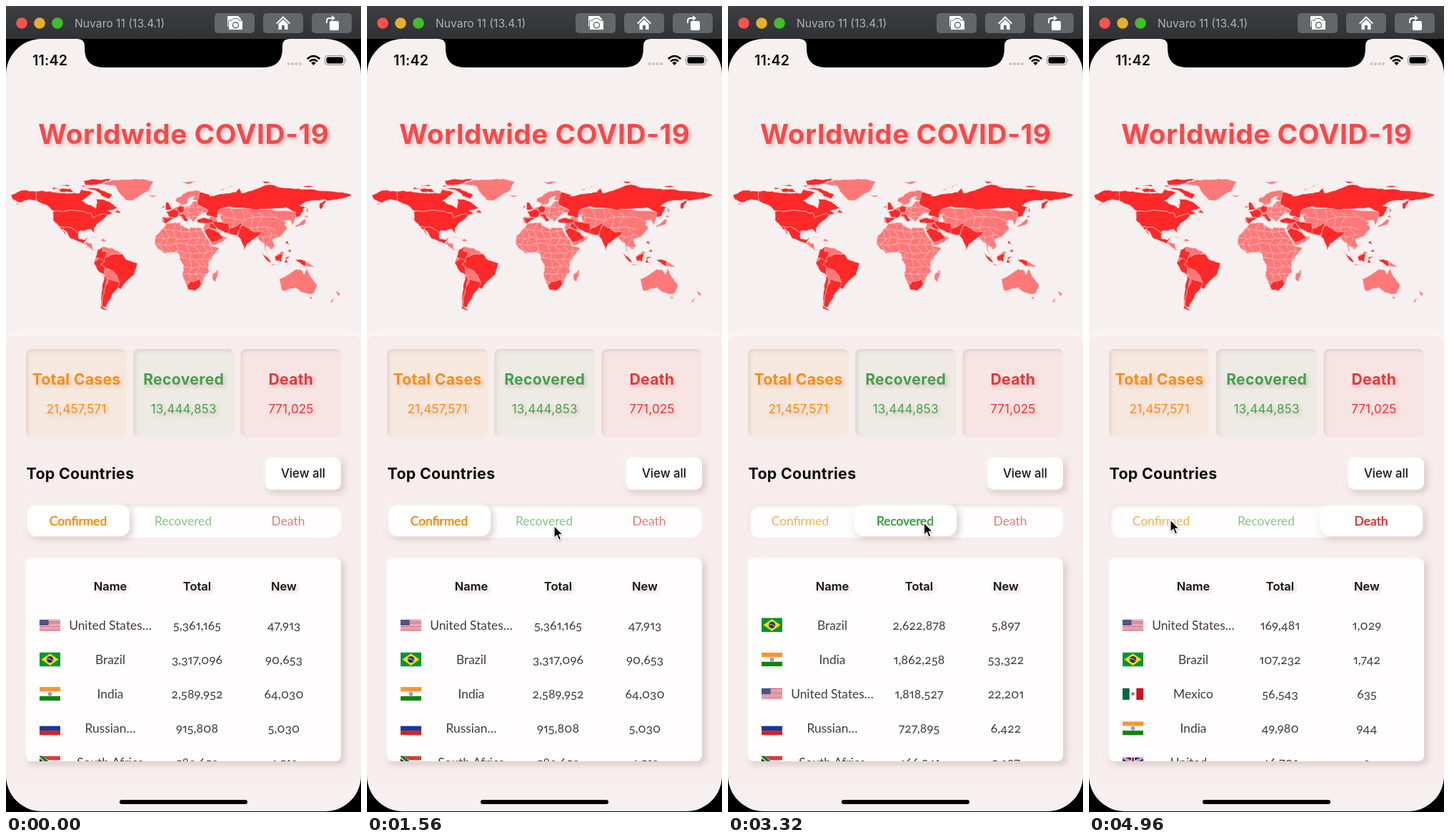
These frames come from a looping animation (497 px wide and 1128 px high, 5 s). An HTML page:

```html
<!DOCTYPE html>
<html lang="en">
<head>
<meta charset="utf-8">
<title>Worldwide COVID-19</title>
<style>
html,body{margin:0;width:100%;height:100%;overflow:hidden;background:#000}
svg{display:block;width:497px;height:1128px}
svg svg{width:auto;height:auto}
text{font-family:Inter,sans-serif}
.mid{text-anchor:middle}
.bold{font-weight:700;letter-spacing:.3px}
.title{font-weight:700;letter-spacing:.55px}
.value{letter-spacing:.2px}
.lato{font-family:Lato,sans-serif;font-size:17.4px;text-anchor:middle}
.num{font-variant-numeric:oldstyle-nums proportional-nums;letter-spacing:.1px}
.glow{filter:drop-shadow(-3px -3px 3px rgba(255,255,255,.7)) drop-shadow(3px 3px 2.5px rgba(150,110,110,.3))}
.raise{filter:drop-shadow(-3px -3px 4px rgba(255,255,255,.7)) drop-shadow(4px 4px 4px rgba(150,115,115,.33))}
.land path{stroke:#f7efef;stroke-width:.35;stroke-linejoin:round}
</style>
</head>
<body>
<svg id="stage" viewBox="0 0 497 1128" xmlns="http://www.w3.org/2000/svg"></svg>
<script>
const LOOP = 5000, STEP = 40, PAGE_W = 499, TAB_W = 147;

// Key points of each land, longitude then latitude; '/' parts islands
const pale = {
  centralAmerica: '-92 15 -88 18 -88 16 -83 15 -82 9 -77 8 -83 8',
  caribbean: '-85 22 -74 20 -78 21/-74 18 -72 20 -68 18',
  southAmerica: '-77 8 -71 12 -61 10 -51 4 -48 -1 -35 -6 -39 -18 -48 -26 -58 -34 -70 -40 -70 -18 -81 -5 -79 2',
  greenland: '-73 78 -60 82 -30 83 -18 80 -24 70 -43 60 -48 61 -54 68 -58 75',
  northAtlantic: '-24 65.5 -15 66 -19 63.5/-10 52 -8 55 -6 53/11 79.5 27 80 17 77',
  africa: '-17 21 -17 14 -13 9 -7 4.5 4 6 9 4 9 -1 13 -7 12 -17 18 -33 26 -34 33 -27 35 -20 40 -15 39 -5 51 11 43 12 35 25 32 31 20 32 19 30 10 34 10 37 -5 36 -10 30',
  madagascar: '49 -12 50 -16 47 -25 44 -23 44 -17',
  europe: '-9 43 -9 37 -5 36 3 42 9 44 16 38 18 40 13 45 20 41 23 36 26 41 28 43 31 46 39 47 39 50 28 56 28 59 23 59 20 54.5 12 54 10 57 8 54 -5 48 -1 46 -2 43',
  scandinavia: '5 59 5 62 15 68 25 71 31 70 28 60 22 61 25 65 18 62 17 57 13 55.5 8 58',
  asia: '36 36 34 31 39 21 43 13 52 16 60 22 52 24 48 30 56 27 67 25 73 20 77 8 80 15 90 22 95 16 98 15 99 8 103 1 100 8 100 13 105 9 109 12 106 19 114 22 122 30 119 35 122 37 118 39 125 40 127 34 129 37 131 43 134 48 90 52 50 52 47 46 53 45 51 44 53 37 49 38 47 43 41 43',
  borneoPapua: '109 2 117 7 119 5 115 2/141 -3 151 -10 141 -9',
  japan: '130 32 131 34 140 41 142 39 140 35/140 42 142 45 145 43',
  australia: '114 -22 116 -33 118 -35 131 -31 136 -35 144 -38.5 150 -37 153 -28 146 -19 142 -11 140 -17.5 136 -12 131 -12 122 -18/145 -41 148 -41 147 -43.5',
  newZealand: '173 -35 178 -38 175 -41/173 -41 169 -46.5 167 -46'
};
const strong = {
  alaska: '-168 66 -157 71 -141 70 -141 60 -150 61 -164 55 -158 58 -166 61',
  canada: '-141 70 -128 70 -115 68 -96 68 -94 72 -82 69 -94 60 -82 54 -79 52 -78 62 -70 61 -65 59 -56 52 -66 49.5 -61 46 -67 45 -70 47 -75 45 -82 42 -84 47 -95 49 -123 49 -130 55 -141 60',
  arctic: '-90 73 -76 73 -62 67 -65 62 -73 65 -78 70/-118 72 -106 73 -102 69 -116 69/-125 72 -124 74 -117 73/-90 76.5 -92 81 -62 82.5 -78 76.5/-95 76 -80 75.5 -92 74.7/-117 76 -106 76 -108 75',
  newfoundland: '-59 48 -56 51 -53 47',
  usa: '-124 48 -123 49 -95 49 -84 47 -82 42 -75 45 -70 47 -67 45 -76 37 -81 31 -80 25 -84 30 -97 28 -97 26 -106 32 -117 32.5 -124 40',
  mexico: '-117 32.5 -106 32 -97 26 -97 20 -91 19 -87 21.5 -92 15 -105 20 -114 31 -110 23',
  brazil: '-51 4 -48 -1 -35 -6 -39 -18 -48 -26 -53 -33 -58 -30 -54 -25 -60 -15 -70 -10 -74 -7 -70 -4 -69 1 -60 4',
  argentina: '-66 -22 -54 -26 -58 -34 -62 -39 -69 -52 -73 -50 -70 -33',
  chile: '-70 -18 -67 -23 -70 -33 -73 -50 -66 -55 -74 -53 -73 -37',
  peru: '-81 -5 -75 0 -70 -4 -74 -7 -70 -10 -70 -18 -76 -14',
  colombia: '-77 8 -71 12 -72 7 -67 6 -69 1 -70 -4 -79 1',
  southAfrica: '17 -29 20 -25 30 -22 32 -28 26 -34 18 -34',
  britain: '-5 50 -5 58.5 -2 57 1.5 52',
  westEurope: '-9 43 -7 37 -5 36 3 42/-2 43 3 42 7 44 8 49 2 51 -5 48/6 51 8 47.5 13 48 14 54 8 54/7 45 13 46 18 40 16 38 10 44',
  turkey: '27 40 36 42 44 40 44 37 36 36 28 37',
  russia: '28 60 30 69 41 67 40 65 68 69 72 73 74 68 104 77 114 74 140 72 180 69 190 66 178 62 163 60 157 51 156 57 163 61 142 59 135 55 141 53 136 44 131 43 131 48 121 53 90 50 61 54 50 50 48 42 37 45 39 50 28 56',
  siberianIsles: '52 71 68 77 58 73/96 80 105 79 100 78/138 75.5 150 75 143 74/142 54 144 49 142 46',
  middleEast: '44 39 54 37 61 36 62 25 50 30 45 34/42 37 45 35 48 30 39 32/35 28 39 21 43 16 55 21 50 27 46 29 38 31',
  southAsia: '62 25 61 30 75 37 70 24/70 23 71 28 74 35 79 32 88 27 97 28 90 22 80 15 77 8 73 20',
  indonesia: '95 5.5 106 -5 102 -4/105 -6.5 114 -8 107 -7.5/109 1.5 117 4 116 -4 110 -3/119 -5 120 1 125 1.5 121 -1 123 -5/131 -1 141 -3 141 -9 133 -4',
  philippines: '120 16 122 18 124 13/122 7 126 9 126 6'
};

// Repeatable noise, -1 to 1, so that neighbours share the same border
const noise = (x, y) => { const v = Math.sin(x * 12.9898 + y * 78.233) * 43758.5453; return (v - Math.floor(v)) * 2 - 1; };
function rough([ax, ay], [bx, by], depth) {
  const x = (ax + bx) / 2, y = (ay + by) / 2, d = Math.min(.7, Math.hypot(bx - ax, by - ay) * .13);
  const m = [x + d * noise(x, y), y + d * noise(y, x)];
  return depth ? [...rough([ax, ay], m, depth - 1), ...rough(m, [bx, by], depth - 1)] : [[ax, ay]];
}
function coast(part) {
  const v = part.split(' ').map(Number), pts = [];
  for (let i = 0; i < v.length; i += 2) pts.push([v[i], v[i + 1]]);
  const out = pts.flatMap((p, i) => rough(p, pts[(i + 1) % pts.length], 3));
  return `M${out.map(p => p.map(n => n.toFixed(2))).join(' ')}Z`;
}
const outline = s => s.split('/').map(coast).join('');
const lands = (set, fill) => `<g fill="${fill}">${Object.values(set).map(s => `<path d="${outline(s)}"/>`).join('')}</g>`;

// Uneven net of inland borders
function net(left, bottom, cols, rows, step) {
  const node = (i, j) => {
    const x = left + i * step + (j % 2) * step / 2, y = bottom + j * step;
    return [x + noise(x, y) * step * .25, y + noise(y, x) * step * .25];
  };
  const edge = (a, b) => `M${[...rough(a, b, 2), b].join(' ')}`;
  let d = '';
  for (let i = 0; i < cols; i++) for (let j = 0; j < rows; j++) {
    d += edge(node(i, j), node(i + 1, j));
    if (noise(i, j + left) < .7) d += edge(node(i, j), node(i, j + 1));
  }
  return `<path d="${d}" fill="none"/>`;
}
const map = `<g class="land" transform="translate(231 352.5) scale(1.333 -1.333)">
  <clipPath id="inland"><path d="${Object.values(pale).map(outline).join('')}"/></clipPath>
  ${lands(pale, '#ff7878')}
  <g clip-path="url(#inland)">${net(-20, -32, 10, 9, 7.6)}${net(12, 38, 5, 4, 5)}${net(52, 12, 6, 4, 10)}</g>
  ${lands(strong, '#ff2929')}</g>`;

const bars = (...c) => c.map((f, i) => `<rect y="${i * 16 / 3}" width="29" height="5.4" fill="${f}"/>`).join('');
const field = c => `<path fill="${c}" d="M0 0H29V16H0Z"/>`;
const stripes = [...Array(7).keys()].map(i => `M0 ${.6 + i * 2.46}H29`).join('');
// height on screen, drawing in a 29 by 16 field
const flags = {
  us: [15.3, `${field('#fff')}<path stroke="#c2364a" stroke-width="1.23" d="${stripes}"/><path fill="#3b3f78" d="M0 0H12.5V8.6H0Z"/><path stroke="#9ea0c2" stroke-dasharray="1 1.1" d="M1 2H12M1 4.3H12M1 6.6H12"/>`],
  br: [20, field('#079338') + '<path fill="#f8d90f" d="M2.5 8 14.5 1.3 26.5 8 14.5 14.7Z"/><ellipse cx="14.5" cy="8" rx="4.6" ry="3.7" fill="#22306f"/><path d="M10.2 7Q15 6.6 18.5 9.5" fill="none" stroke="#fff" stroke-width=".7"/>'],
  in: [19.3, bars('#ff9431', '#fff', '#0c8508') + '<ellipse cx="14.5" cy="8" rx="2.2" ry="1.9" fill="#dcdcf0" stroke="#27276e" stroke-width=".7"/><circle cx="14.5" cy="8" r=".6" fill="#27276e"/>'],
  ru: [19.3, bars('#fff', '#0c3aa5', '#d5241d')],
  mx: [16.6, field('#fff') + '<path fill="#0a6847" d="M0 0H9.7V16H0Z"/><path fill="#cd1126" d="M19.3 0H29V16H19.3Z"/><circle cx="14.5" cy="8" r="2.4" fill="#9b8a5c"/>'],
  za: [19.3, field('#fff') + '<path fill="#df3a2f" d="M4 0H29V5H12Z"/><path fill="#12289b" d="M4 16H29V11H12Z"/><path d="M0-1 12 8 0 17M12 8H29" fill="none" stroke="#087a4d" stroke-width="3.4"/><path fill="#fbb717" d="M0 1.6 8.6 8 0 14.4Z"/><path d="M0 3.3 6.5 8 0 12.7Z"/>'],
  gb: [15, field('#17256f') + '<path stroke="#fff" stroke-width="3" d="M0 0 29 16M29 0 0 16"/><path stroke="#cc1b32" d="M0 0 29 16M29 0 0 16"/><path stroke="#fff" stroke-width="5.2" d="M14.5 0V16M0 8H29"/><path stroke="#cc1b32" stroke-width="3" d="M14.5 0V16M0 8H29"/>']
};
const tables = [
  ['us|United States…|5,361,165|47,913', 'br|Brazil|3,317,096|90,653', 'in|India|2,589,952|64,030', 'ru|Russian…|915,808|5,030', 'za|South Africa|583,653|4,513'],
  ['br|Brazil|2,622,878|5,897', 'in|India|1,862,258|53,322', 'us|United States…|1,818,527|22,201', 'ru|Russian…|727,895|6,422', 'za|South Africa|466,941|5,397'],
  ['us|United States…|169,481|1,029', 'br|Brazil|107,232|1,742', 'mx|Mexico|56,543|635', 'in|India|49,980|944', 'gb|United…|46,701|3']
];
const tabs = [['Confirmed', '#f2b050', '#f28a08'], ['Recovered', '#85c588', '#389b3d'], ['Death', '#df7c79', '#df2f2b']];
const stats = [['Total Cases', '21,457,571', '#fb8c0b', '#f7e8dd'], ['Recovered', '13,444,853', '#41a247', '#eeeae4'], ['Death', '771,025', '#ec3535', '#f7e4e3']];

const text = (x, y, size, fill, str, cls = 'mid', more = '') =>
  `<text x="${x}" y="${y}" font-size="${size}" fill="${fill}" class="${cls}" ${more}>${str}</text>`;
const box = (x, y, w, h, r, fill, more = '') =>
  `<rect x="${x}" y="${y}" width="${w}" height="${h}" rx="${r}" fill="${fill}" ${more}/>`;
let wells = 0;
const sunken = (x, y, w, h, r, fill) => {
  const id = 'well' + wells++;
  return `<clipPath id="${id}">${box(x, y, w, h, r, '#000')}</clipPath><g clip-path="url(#${id})">${box(x, y, w, h, r, fill)}` +
    box(x - 1, y - 1, w + 10, h + 10, r, 'none', 'stroke="#b9a3a0" stroke-opacity=".6" stroke-width="4" filter="url(#soft)"') + '</g>';
};

const rowSvg = (row, i) => {
  const [code, name, total, fresh] = row.split('|'), [h, art] = flags[code], y = 866.3 + i * 48.2;
  const cell = (x, s, c) => `<text x="${x}" y="${y + 6.2}" class="lato ${c}" fill="#3d3c3e">${s}</text>`;
  return `<g transform="translate(47 ${y - h / 2}) scale(1 ${h / 16})"><g clip-path="url(#flag)">${art}</g></g>` +
    cell(146, name, '') + cell(267.5, total, 'num') + cell(389, fresh, 'num');
};
const heads = ['Name', 'Total', 'New'].map((s, i) =>
  text(146 + i * 121.5, 818, 16.5, '#151515', s, 'mid glow', 'font-weight="600"')).join('');
const pageSvg = (rows, i) => `<g transform="translate(${i * PAGE_W})">${box(28, 773, 441, 284, 8, '#fffdfd', 'class="raise"')}
  <g clip-path="url(#card)">${heads}${rows.map(rowSvg).join('')}</g></g>`;

const header = box(0, 0, 497, 46, 0, 'url(#bar)') +
  ['#fc5350', '#e4b02c', '#42be2c'].map((c, i) => `<circle cx="${22 + i * 25}" cy="24" r="7.8" fill="${c}"/>`).join('') +
  text(96, 30, 15.7, '#b0b1b3', 'Nuvaro 11 (13.4.1)', '') +
  [292, 360, 428].map(x => box(x, 10, 56, 28, 5, '#656669')).join('') +
  `<g fill="#fff"><path d="M310 14h15l4 4v3h-15v8h-4Z"/>
  <path d="M313 20h3l2-2.5h6l2 2.5h4q1.5 0 1.5 1.5V32q0 1.5-1.5 1.5h-17q-1.5 0-1.5-1.5V21.5q0-1.5 1.5-1.5Z" stroke="#656669"/>
  <circle cx="321.5" cy="26.8" r="4" fill="none" stroke="#656669" stroke-width="1.5"/>
  <path d="M388 14 398 24 396.5 25.2 388 17 379.5 25.2 378 24ZM381.5 25 388 19 394.5 25V33H390V27H386V33H381.5Z"/>
  <rect x="453" y="21" width="13" height="13" rx="2"/><path d="M449 24v-3q0-4 4-4h4" fill="none" stroke="#fff" stroke-width="2"/><path d="M456 13 461 17 456 21Z"/></g>`;

const status = text(37, 83, 19.6, '#0d0d0d', '11:42', 'value', 'font-weight="600"') +
  [0, 1, 2, 3].map(i => `<circle cx="${395.5 + i * 5.5}" cy="81" r="2" fill="#c7c1c1"/>`).join('') +
  `<path d="M421.8 74Q430.5 66 439.2 74M425 77.6Q430.5 72.8 436 77.6" fill="none" stroke="#000" stroke-width="2.6"/><path d="M427.3 79.6Q430.5 77 433.7 79.6L430.5 82.9Z"/>
  <rect x="446.5" y="69.5" width="27.5" height="13" rx="4" fill="none" stroke="#8c8787"/>${box(448.5, 71.5, 23.5, 9, 2.4, '#000')}<path d="M475.5 74V78.5Q477.5 76.2 475.5 74Z" fill="#8c8787"/>`;

const statCards = stats.map(([name, value, ink, fill], i) => {
  const x = 28 + i * 150.2, c = x + 70.5;
  return sunken(x, 480, 141, 123, 8, fill) + text(c, 529.7, 21.2, ink, name, 'mid bold glow') + text(c, 569.7, 17, ink, value, 'mid value glow');
}).join('');

const tabText = ([name, dim, lit], i, on) =>
  `<text x="${101 + i * TAB_W}" y="726.5" class="lato ${on ? 'lit' : ''}" fill="${on ? lit : dim}" ${on ? `stroke="${lit}" stroke-width=".5"` : ''}>${name}</text>`;

document.getElementById('stage').innerHTML = `<defs>
  <linearGradient id="bar" x2="0" y2="1"><stop stop-color="#3e3f42"/><stop offset="1" stop-color="#303134"/></linearGradient>
  <filter id="soft" x="-10%" y="-30%" width="120%" height="160%"><feGaussianBlur stdDeviation="3"/></filter>
  <clipPath id="card">${box(28, 773, 441, 284, 8, '#000')}</clipPath><clipPath id="flag">${box(0, 0, 29, 16, 0, '#000')}</clipPath></defs>
  ${box(0, 0, 497, 1128, 0, '#000')}${header}${box(0, 46, 497, 1081, 50, '#f6f0f0')}
  <path d="M100 46Q110 46 110 56V59Q110 86 137 86H360Q387 86 387 59V56Q387 46 397 46Z"/>
  ${status}${box(0, 456, 497, 30, 12, '#fbf6f6', 'filter="url(#soft)"')}${box(0, 461, 497, 625, 12, '#f7edec')}
  ${text(248.7, 193.3, 38.7, '#ff4747', 'Worldwide COVID-19', 'mid title glow')}${map}${statCards}
  ${text(28.5, 662, 21.4, '#0c0c0c', 'Top Countries', 'bold')}
  ${box(363, 632, 106, 45, 9, '#fff', 'class="raise"')}${text(416, 660, 16.8, '#151515', 'View all', 'mid', 'font-weight="500"')}
  ${sunken(28, 697, 441, 47, 16, '#fffdfd')}${tabs.map((t, i) => tabText(t, i, false)).join('')}
  <g id="pill">${box(30, 698.5, 143, 43.5, 13, '#fff', 'class="raise"')}</g>${tabs.map((t, i) => tabText(t, i, true)).join('')}
  <g id="pages">${tables.map(pageSvg).join('')}</g>
  ${box(159, 1111, 179, 6, 3, '#000')}
  <path id="cursor" d="M0 0V17L4 13.3 6.7 20 9.6 18.8 6.9 12.3H12Z" stroke="#fff" stroke-width="1.2" style="filter:drop-shadow(0 1px 1px rgba(0,0,0,.3))"/>`;

const [pill, pages, cursor] = ['pill', 'pages', 'cursor'].map(id => document.getElementById(id));
const lit = [...document.querySelectorAll('.lit')];
const taps = [2400, 3824];
const unit = v => Math.min(1, Math.max(0, v));
const smooth = v => v * v * (3 - 2 * v);

// cubic-bezier(.25, .1, .25, 1)
function ease(x) {
  let lo = 0, hi = 1;
  for (let i = 0; i < 24; i++) {
    const m = (lo + hi) / 2, n = 1 - m;
    if (.75 * n * n * m + .75 * n * m * m + m * m * m < x) lo = m; else hi = m;
  }
  const n = 1 - lo;
  return .3 * n * n * lo + 3 * n * lo * lo + lo * lo * lo;
}

// start, end, from, bend, to
const moves = [
  [680, 980, [390, 860], [330, 770], [295.5, 735]],
  [1240, 1760, [295.5, 735], [268, 732], [248, 721]],
  [3160, 3720, [248, 721], [315, 728], [379, 719]],
  [3960, 4760, [379, 719], [277.5, 889], [114, 719]]
];
function cursorAt(t) {
  const [a, b, p, q, r] = moves.filter(m => t >= m[0]).pop() || moves[0];
  const k = smooth(unit((t - a) / (b - a))), j = 1 - k;
  return p.map((v, i) => j * j * v + 2 * j * k * q[i] + k * k * r[i]);
}

function draw(t) {
  const slide = taps.map(s => unit((t - s) / 200));
  const page = taps.reduce((sum, s) => sum + ease(unit((t - s) / 220)), 0);
  const active = taps.filter(s => t >= s).length;
  pill.setAttribute('transform', `translate(${(slide[0] + slide[1]) * TAB_W})`);
  pages.setAttribute('transform', `translate(${-page * PAGE_W})`);
  lit.forEach((el, i) => el.setAttribute('opacity', i !== active ? 0 : i ? slide[i - 1] : 1));
  cursor.setAttribute('visibility', t < moves[0][0] ? 'hidden' : 'visible');
  cursor.setAttribute('transform', `translate(${cursorAt(t)})`);
}

const begin = performance.now();
function tick() {
  const t = (performance.now() - begin) % LOOP;
  draw(Math.floor(t / STEP) * STEP);
  requestAnimationFrame(tick);
}
tick();
</script>
</body>
</html>
```
